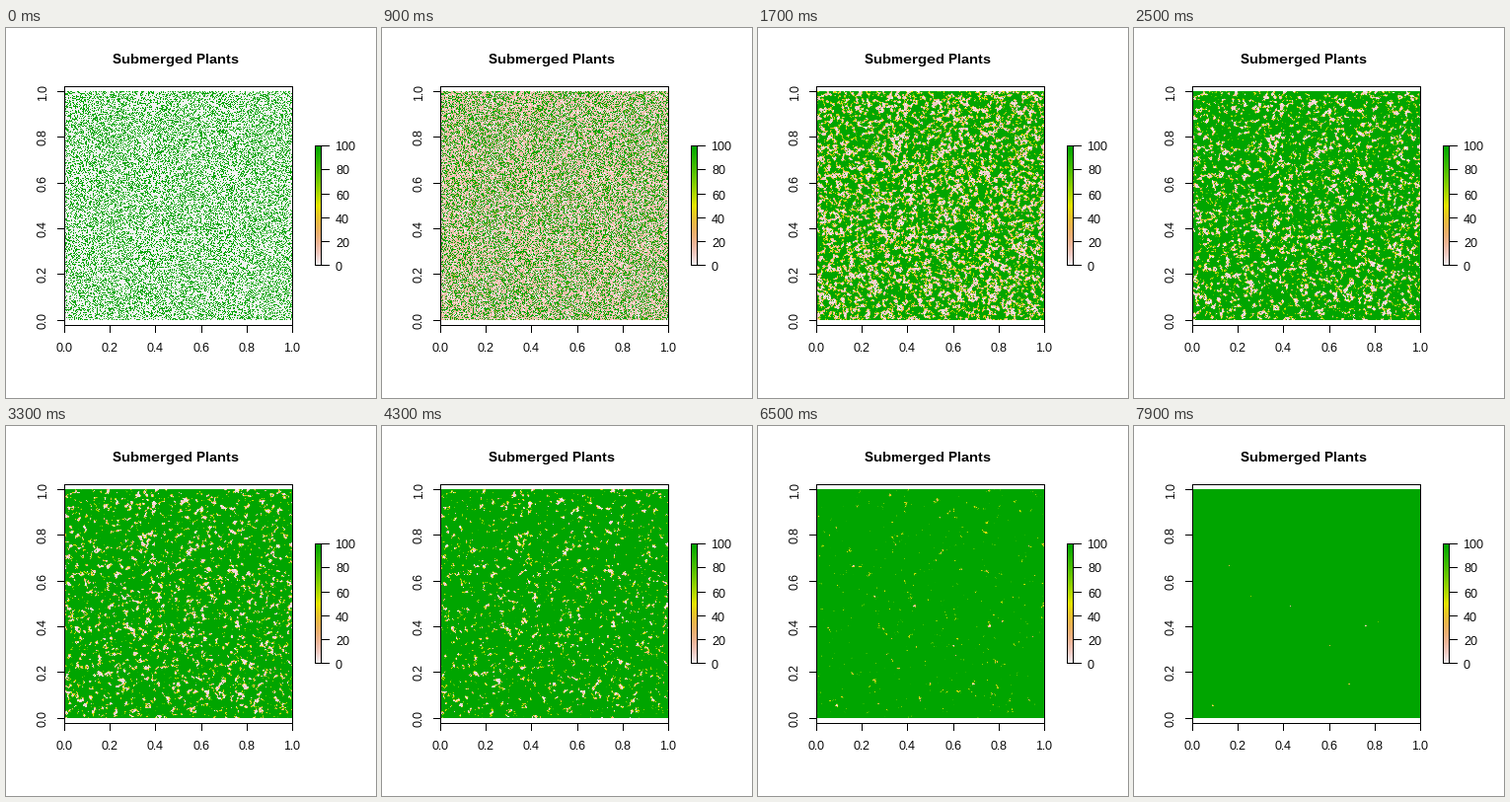
Animation, 375 px wide and 375 px high, one loop 8000 ms. Source, as a matplotlib script:

```python
import colorsys

import matplotlib
import matplotlib.pyplot as plt
import numpy as np
from matplotlib.animation import FuncAnimation
from matplotlib.colors import ListedColormap
from matplotlib.patches import Rectangle

matplotlib.rcParams.update({
    "font.family": "Liberation Sans",
    "text.hinting": "native",
    "text.hinting_factor": 1,
    "toolbar": "None",
})

SIZE, DPI = 375, 100
PX = 72 / DPI
STEP, FRAMES = 100, 80
SHAPE = H, W = 232, 231
rng = np.random.default_rng(11)


def terrain(v):
    """Grey-pink-yellow-green ramp for v in 0..1."""
    if v < 0.5:
        k = 2 * v
        return colorsys.hsv_to_rgb(k / 6, k, 0.95 - 0.05 * k)
    k = 2 * v - 1
    return colorsys.hsv_to_rgb((1 + k) / 6, 1, 0.9 - 0.25 * k)


cmap = ListedColormap([terrain(i / 254) for i in range(255)])


def blur(a, sigma):
    offs = np.arange(-4, 5)
    w = np.exp(-offs ** 2 / (2 * sigma ** 2))
    w /= w.sum()
    for axis in (0, 1):
        a = sum(k * np.roll(a, o, axis) for k, o in zip(w, offs))
    return a


# Established plants, and the gaps that close last
seeds = rng.random(SHAPE) < 0.33
gaps = [(0.163, 0.665), (0.258, 0.533), (0.43, 0.49), (0.605, 0.315),
        (0.692, 0.15), (0.76, 0.405), (0.818, 0.42), (0.09, 0.055)]
rows, cols = np.mgrid[:H, :W]
dip = np.zeros(SHAPE)
for gx, gy in gaps:
    c, r = int(gx * W), int((1 - gy) * H)
    seeds[r, c] = False
    dip += np.exp(-((cols - c) ** 2 + (rows - r) ** 2) / 2)

# Empty cells fill in order of how crowded their surroundings are
crowd = blur(seeds.astype(float), 1.1) + rng.normal(0, 0.04, SHAPE) - 0.7 * dip
empty = ~seeds
rank = np.argsort(np.argsort(-crowd[empty])) / (empty.sum() - 1)
left = [1, 0.62, 0.43, 0.27, 0.16, 0.065, 0.01, 0.0004, 0]
times = [1050, 1700, 2400, 3300, 4300, 5500, 7000, 7900, 10000]
full = np.zeros(SHAPE)
full[empty] = np.interp(rank, [1 - p for p in left], times)
span = np.clip(full - 800, 250, 2600) * rng.uniform(0.6, 1.05, SHAPE)
sprout = np.where(rng.random(SHAPE) < 0.8, rng.uniform(0.7, 1.3, SHAPE), 0)


def cover(t):
    grown = 100 * np.clip(1 - (full - t) / span, 0, 1)
    flush = sprout * np.interp(t, [0, 500, 900, 1700, 5000], [0, 4, 14, 9, 4])
    return np.where(seeds, 100, np.maximum(grown, flush) if t else 0)


fig = plt.figure(figsize=(SIZE / DPI, SIZE / DPI), dpi=DPI, facecolor="white")
ax = fig.add_axes([0, 0, 1, 1])


def raster(data, extent):
    return ax.imshow(data, cmap=cmap, vmin=0, vmax=100,
                     interpolation="nearest", extent=extent)


field = raster(cover(0), (59, 290, 296, 64))
raster(np.linspace(100, 0, 122)[:, None], (313, 320, 241, 119))
ax.set(xlim=(0, SIZE), ylim=(SIZE, 0), aspect="auto")
ax.axis("off")


def line(x0, y0, x1, y1):
    ax.add_patch(Rectangle((x0, y0), x1 - x0 + 1, y1 - y0 + 1,
                           fc="black", lw=0, antialiased=False, zorder=3))


def frame(x0, y0, x1, y1):
    for y in (y0, y1):
        line(x0, y, x1, y)
    for x in (x0, x1):
        line(x, y0, x, y1)


def label(x, y, s, size=12, **kw):
    kw.setdefault("va", "baseline")
    ax.text(x, y, s, fontsize=size * PX, **kw)


frame(59, 59, 290, 301)
frame(313, 119, 319, 240)
label(172.5, 36, "Submerged Plants", 14.4, ha="center", weight="bold")
for i in range(6):
    x, y = round(59 + 46.2 * i), round(295.8 - 46.4 * i)
    line(x, 302, x, 308)
    line(52, y, 58, y)
    label(x, 328, f"{i / 5:.1f}", ha="center")
    label(42.5, y + 0.5, f"{i / 5:.1f}", rotation=90, ha="right", va="center")
    y = round(240.2 - 24.2 * i)
    line(320, y, 327, y)
    label(334, y + 5.5, str(20 * i), ha="left")


def update(i):
    t = i * STEP
    if t < 700:
        t = 500 if t >= 500 else 0
    field.set_data(cover(t))
    return [field]


anim = FuncAnimation(fig, update, frames=FRAMES, interval=STEP,
                     repeat=True, repeat_delay=0, blit=False)
plt.show()
```
